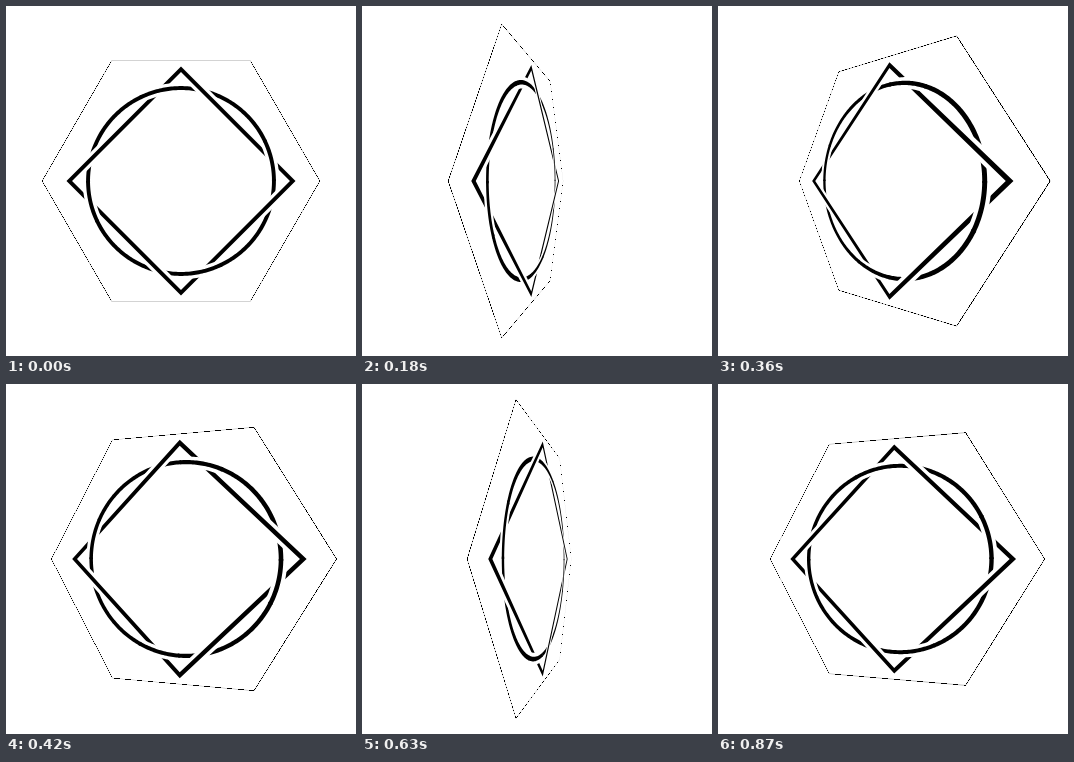
An HTML page for the animation above (0.9 s loop, 350 by 350 pixels).

```html
<!DOCTYPE html>
<html lang="en">
<head>
<meta charset="utf-8">
<title>Turning knot</title>
<style>
  html, body { margin: 0; width: 100%; height: 100%; overflow: hidden; background: #fff; }
  svg { display: block; width: 350px; height: 350px; }
</style>
</head>
<body>
<svg viewBox="0 0 350 350" fill-rule="evenodd"></svg>
<script>
const LOOP = 900, STEP = 30;
const CENTER = 175, EYE = 300, DEPTH = -6;
const HEX = 141.9, HEX_LINE = 0.5;
const TIP = 116.8, LINE = 4, GAP = 5.4;
const RADIUS = 94.8;                           // middle of the circle's line
const SIDE = TIP * Math.SQRT1_2 - LINE / 2;    // middle of the square's line
const CROSS = Math.acos(SIDE / RADIUS) * 180 / Math.PI;
const REACH = 20;
const QUARTERS = [45, 135, 225, 315];

const svg = document.querySelector('svg');
const rad = deg => deg * Math.PI / 180;

function polar(r, deg) {
  return [r * Math.cos(rad(deg)), -r * Math.sin(rad(deg))];
}

function arc(r, from, to, step) {
  const pts = [];
  for (let a = from; a <= to; a += step) pts.push(polar(r, a));
  return pts;
}

// A ring between two regular polygons with the same corners.
function ring(outer, inner, step) {
  return [outer, inner].map(r => arc(r, 0, 360 - step, step));
}

function arcBand(mid, half, spread) {
  const from = Math.round(mid) - spread, to = from + 2 * spread;
  return arc(RADIUS + half, from, to, 1)
    .concat(arc(RADIUS - half, from, to, 1).reverse());
}

// A strip along the square's side whose normal points at the given angle.
function sideBand(normal, half) {
  const c = Math.cos(rad(normal)), s = Math.sin(rad(normal));
  const mid = Math.sqrt(RADIUS * RADIUS - SIDE * SIDE);
  return [[-1, -1], [1, -1], [1, 1], [-1, 1]].map(([i, j]) => {
    const d = SIDE + i * half, t = mid + j * REACH;
    return [d * c - t * s, -(d * s + t * c)];
  });
}

const arcs = (half, spread) => QUARTERS.map(a => arcBand(a - CROSS, half, spread));
const hex = ring(HEX, HEX - HEX_LINE / Math.cos(rad(30)), 60);

// The hexagon's hairline is hard-edged over a faint soft one.
// The black arcs overlap the white ones a little to hide the seams.
const layers = [
  [{ 'fill-opacity': 0.35 }, hex],
  [{ 'shape-rendering': 'crispEdges' }, hex],
  [{}, ring(RADIUS + LINE / 2, RADIUS - LINE / 2, 1)],
  [{ fill: '#fff' }, QUARTERS.map(a => sideBand(a, GAP))],
  [{}, ring(TIP, TIP - LINE * Math.SQRT2, 90)],
  [{ fill: '#fff' }, arcs(GAP, 12)],
  [{}, arcs(LINE / 2, 13)]
].map(([attrs, shapes]) => {
  const path = document.createElementNS('http://www.w3.org/2000/svg', 'path');
  for (const name in attrs) path.setAttribute(name, attrs[name]);
  svg.append(path);
  return { path, shapes };
});

function draw(deg) {
  const c = Math.cos(rad(deg)), s = Math.sin(rad(deg));
  const project = ([x, y]) => {
    const k = EYE / (EYE + x * s - DEPTH * c);
    return (CENTER + (x * c + DEPTH * s) * k).toFixed(3) + ' ' + (CENTER + y * k).toFixed(3);
  };
  for (const { path, shapes } of layers) {
    path.setAttribute('d', shapes.map(p => 'M' + p.map(project).join('L') + 'Z').join(''));
  }
}

const start = performance.now();
function tick(now) {
  const t = Math.max(0, now - start) % LOOP;
  draw(Math.floor(t / STEP) * STEP / LOOP * 360);
  requestAnimationFrame(tick);
}
draw(0);
requestAnimationFrame(tick);
</script>
</body>
</html>
```
